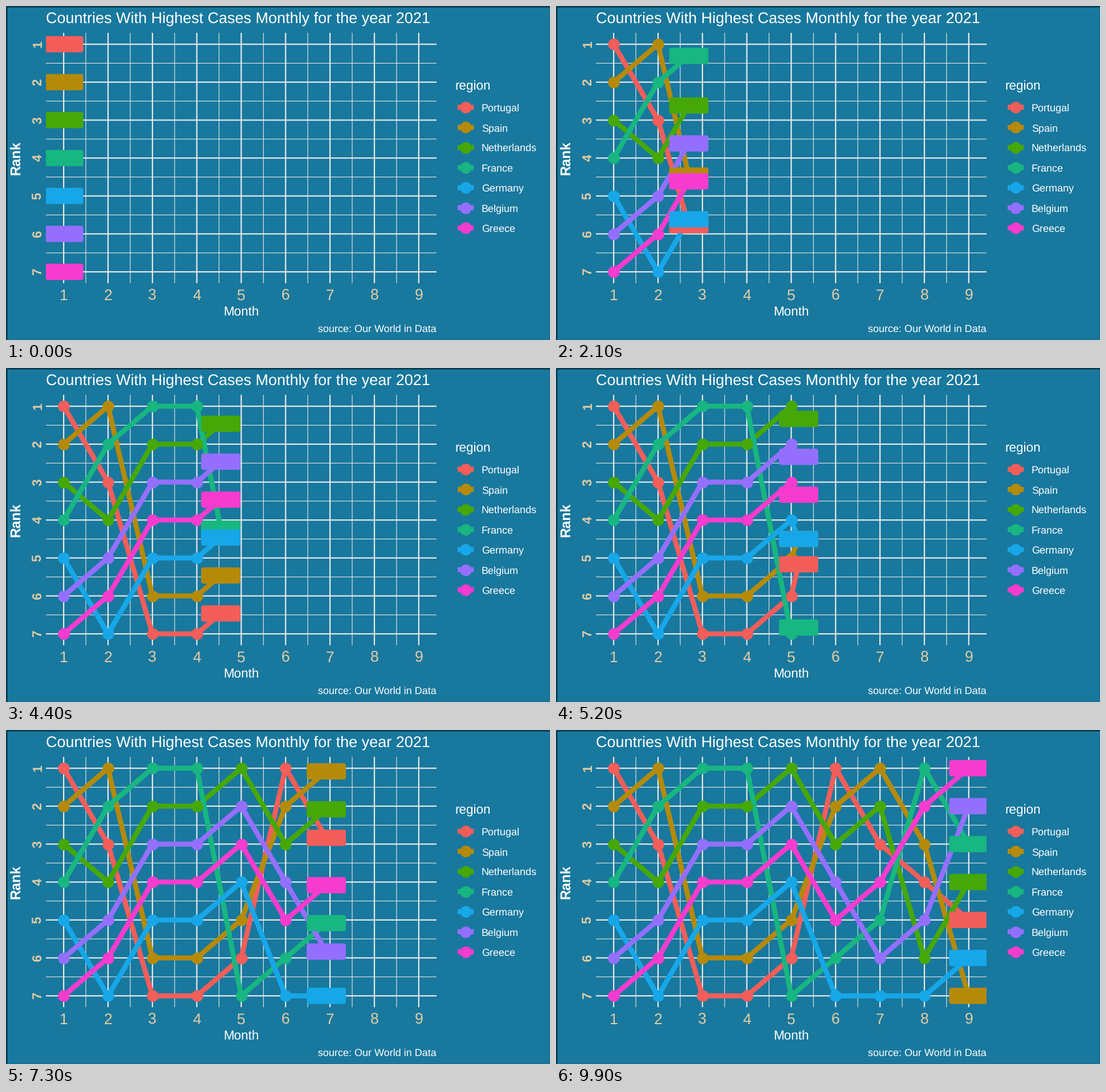
Animation of 954x587 px, one loop 10 s. Source, as a matplotlib script:

```python
import matplotlib.pyplot as plt
import numpy as np
from matplotlib.animation import FuncAnimation
from matplotlib.patches import FancyBboxPatch, Rectangle

W, H, DPI = 954, 587, 64  # a power of two keeps the pixel size exact
FRAMES, INTERVAL = 100, 100
PT = 72 / DPI  # points per pixel

BG, GRID, TICK = "#18789E", "#EBEBEB", "#E3CDA5"
LEFT, RIGHT, TOP, BOTTOM = 70, 755, 47.2, 487.2
LINE_W, DOT = 8.8, 20.4
BOX_W, BOX_H, BOX_R = 68.8, 28.6, 4

# region: (colour, rank in each month)
REGIONS = {
    "Portugal": ("#F35E5A", [1, 3, 7, 7, 6, 1, 3, 4, 5]),
    "Spain": ("#B58A09", [2, 1, 6, 6, 5, 2, 1, 3, 7]),
    "Netherlands": ("#46A807", [3, 4, 2, 2, 1, 3, 2, 6, 4]),
    "France": ("#18B681", [4, 2, 1, 1, 7, 6, 5, 1, 3]),
    "Germany": ("#17A7E8", [5, 7, 5, 5, 4, 7, 7, 7, 6]),
    "Belgium": ("#946FFE", [6, 5, 3, 3, 2, 4, 6, 5, 2]),
    "Greece": ("#F63CCF", [7, 6, 4, 4, 3, 5, 4, 2, 1]),
}
MONTHS = np.arange(1, 10)
# each month is reached on a whole frame
KEYS = np.round((FRAMES - 1) * (MONTHS - 1) / 8)

plt.rcParams["font.family"] = "Liberation Sans"
plt.rcParams["text.hinting"] = "none"


def px(month):
    return LEFT + (np.asarray(month) - 0.6) * (RIGHT - LEFT) / 8.8


def py(rank):
    return TOP + (np.asarray(rank) - 0.7) * (BOTTOM - TOP) / 6.6


fig = plt.figure(figsize=(W / DPI, H / DPI), dpi=DPI, facecolor=BG)
ax = fig.add_axes([0, 0, 1, 1])
ax.set(xlim=(0, W), ylim=(H, 0))
ax.axis("off")


def text(x, y, s, size, color="white", **kw):
    ax.text(x, y, s, fontsize=size * PT, color=color,
            **{"va": "baseline", **kw})


def stroke(xs, ys, color, width, z):
    return ax.plot(xs, ys, color=color, lw=width * PT, zorder=z, snap=False,
                   solid_capstyle="butt", solid_joinstyle="round")[0]


def dots(xs, ys, color, z):
    return ax.plot(xs, ys, "o", color=color, ms=DOT * PT, mew=0, zorder=z)[0]


def grid(months, ranks, width, z):
    for y in py(ranks):
        stroke([LEFT, RIGHT], [y, y], GRID, width, z)
    for x in px(months):
        stroke([x, x], [TOP, BOTTOM], GRID, width, z)


ax.add_patch(Rectangle((0.5, 0.5), W - 1, H - 1, fill=False, ec="black",
                       lw=1.2 * PT))
grid(np.arange(1.5, 9), np.arange(1.5, 7), 1.1, 1)
grid(MONTHS, np.arange(1, 8), 2.2, 2)

text(LEFT - 0.3, 30.7, "Countries With Highest Cases Monthly for the year 2021", 27)
text((LEFT + RIGHT) / 2, 543.8, "Month", 22.5, ha="center")
text(RIGHT, 572.8, "source: Our World in Data", 18, ha="right")
text(28.8, (TOP + BOTTOM) / 2, "Rank", 24.5, weight="bold", rotation=90,
     ha="right", va="center")
for m in MONTHS:
    text(px(m), 517.2, str(m), 26.6, TICK, ha="center")
for r in range(1, 8):
    text(67, py(r), str(r), 22.5, TICK, weight="bold", rotation=90,
         ha="right", va="center")

text(787.5, 147, "region", 22.5)
for i, (name, (color, _)) in enumerate(REGIONS.items()):
    y = 178 + 35.3 * i
    stroke([792, 820.3], [y, y], color, LINE_W, 3)
    dots([806.1], [y], color, 4)
    text(833.7, y + 6.6, name, 18)

panel = Rectangle((LEFT, TOP), RIGHT - LEFT, BOTTOM - TOP,
                  transform=ax.transData)
tracks = []
for i, (color, ranks) in enumerate(REGIONS.values()):
    line = stroke([], [], color, LINE_W, 5 + i / 10)
    marks = dots([], [], color, 6 + i / 10)
    box = FancyBboxPatch((0, 0), BOX_W, BOX_H, fc=color, ec="none",
                         boxstyle=f"round,pad=0,rounding_size={BOX_R}",
                         zorder=7 + i / 10)
    ax.add_patch(box)
    box.set_clip_path(panel)
    tracks.append((np.array(ranks), line, marks, box))


def update(k):
    month = np.interp(k, KEYS, MONTHS)
    seen = KEYS <= k
    for ranks, line, marks, box in tracks:
        xs, ys = px(MONTHS[seen]), py(ranks[seen])
        x, y = px(month), py(np.interp(month, MONTHS, ranks))
        line.set_data(np.append(xs, x), np.append(ys, y))
        marks.set_data(xs, ys)
        box.set_x(x - BOX_W / 2)
        box.set_y(y - BOX_H / 2)
    return []


anim = FuncAnimation(fig, update, frames=FRAMES, interval=INTERVAL,
                     init_func=lambda: update(0), repeat=True, repeat_delay=0)
plt.show()
```
